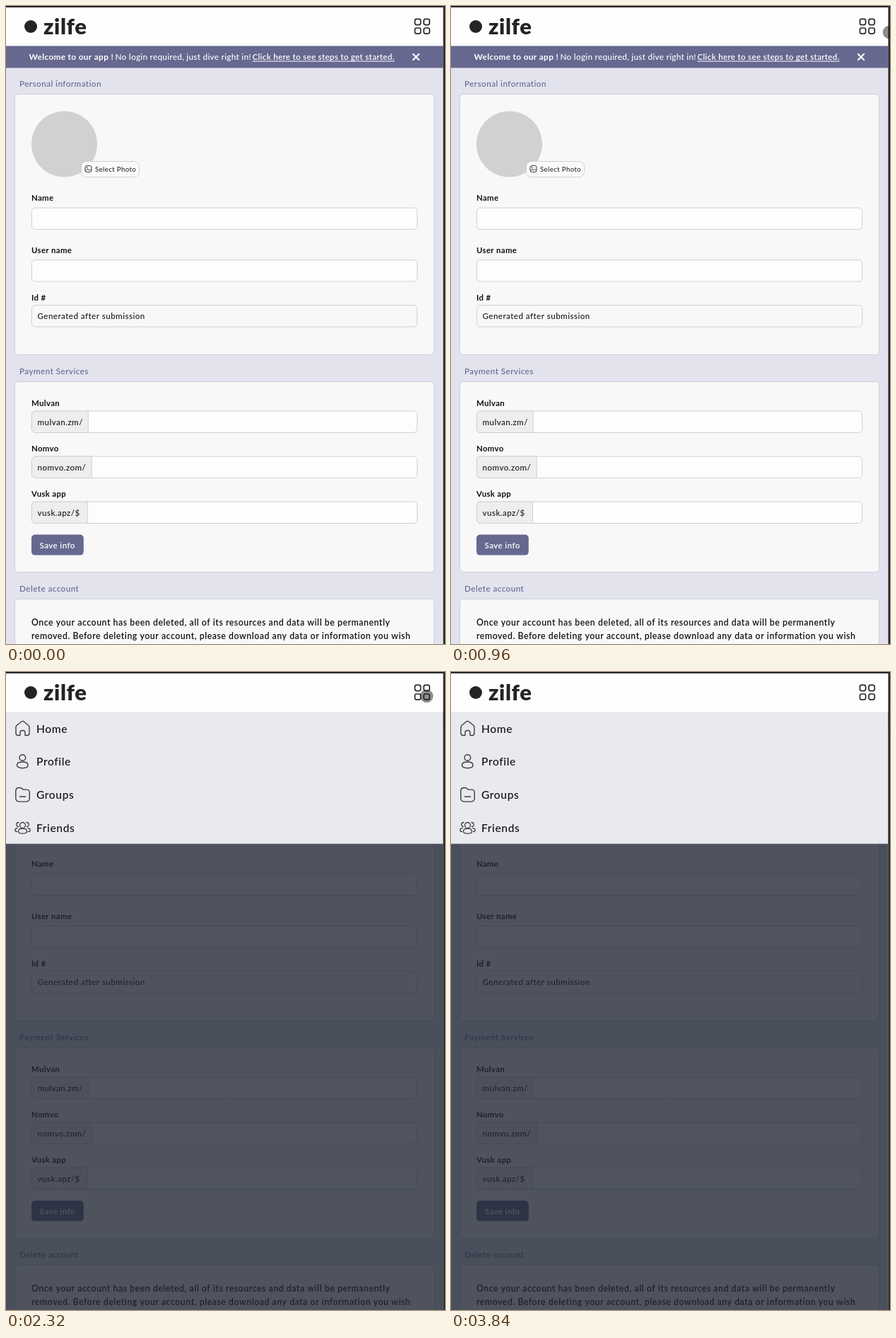
These frames come from a looping animation (621x901 px, 4.56 s). An HTML page with a canvas:

```html
<!DOCTYPE html>
<html lang="en">
<head>
<meta charset="utf-8">
<title>Account settings</title>
<style>
  html, body { margin: 0; width: 100%; height: 100%; overflow: hidden; background: #e2e3ed; }
  canvas { display: block; }
</style>
</head>
<body>
<canvas id="stage" width="621" height="901"></canvas>
<script>
const W = 621, H = 901, LOOP = 4560, STEP = 80;
const PAGE_W = 618.5, HEAD_H = 56.4, MENU_END = 242.6;
const MENU_AT = 1760;
const ACCENT = '#66688f', BORDER = '#cfd0d6', INK = '#17181c';
const ctx = document.getElementById('stage').getContext('2d');

// Pointer dot: time, x, y, opacity
const DOT_PATH = [
  [320, 571, 243, 0.6], [400, 575, 225, 1], [560, 596, 130, 1],
  [720, 613, 52, 1], [799, 618, 38, 1]
];
const DOT_RETURN = [
  [960, 620, 37, 1], [1120, 608, 33, 1], [1280, 596, 30, 1],
  [1360, 594, 29, 1], [2240, 594, 29, 1], [2320, 595, 34, 1],
  [2400, 595, 38, 1], [2640, 595, 38, 1], [2720, 593, 31, 1],
  [2960, 593, 29, 0]
];

function text(str, x, y, size = 11.6, weight = 500, color = INK, gap = 0.45) {
  ctx.font = `${weight} ${size}px Lato, "Open Sans", sans-serif`;
  ctx.letterSpacing = gap + 'px';
  ctx.fillStyle = color;
  ctx.fillText(str, x, y);
}

function box(x, y, w, h, r, fill, stroke, line = 1) {
  ctx.beginPath();
  ctx.roundRect(x, y, w, h, r);
  if (fill) { ctx.fillStyle = fill; ctx.fill(); }
  if (stroke) { ctx.strokeStyle = stroke; ctx.lineWidth = line; ctx.stroke(); }
}

function disc(x, y, r, fill) {
  ctx.beginPath();
  ctx.arc(x, y, r, 0, Math.PI * 2);
  ctx.fillStyle = fill;
  ctx.fill();
}

function line(d, color, width) {
  ctx.strokeStyle = color;
  ctx.lineWidth = width;
  ctx.stroke(new Path2D(d));
}

const label = (str, y) => text(str, 36, y, 11.4, 700, '#111', 0.35);
const heading = (str, y) => text(str, 19, y, 11.7, 500, ACCENT);
const card = (y, h) => box(12.5, y + 0.5, 593, h, 5, '#f8f8f8', '#cdcfe2');
const field = (y, fill = '#fdfdfd') => box(36.4, y + 0.1, 545.3, 30.4, 5, fill, BORDER);

function service(name, prefix, y, split) {
  label(name, y - 7);
  field(y);
  box(36.4, y + 0.1, split - 36.4, 30.4, [5, 0, 0, 5], '#eeeeee', BORDER);
  text(prefix, 44.5, y + 19.5);
}

function drawHeader() {
  ctx.fillStyle = '#fefefe';
  ctx.fillRect(0, 2, PAGE_W, HEAD_H - 2);
  disc(35, 29, 9, '#242427');
  text('zilfe', 53, 40, 31, 900, '#242427', 0.6);
  for (const x of [578.4, 591])
    for (const y of [18.4, 31]) box(x, y, 8.2, 8.2, 2.6, null, '#2b2b2e', 1.7);
}

function drawBanner() {
  ctx.fillStyle = ACCENT;
  ctx.fillRect(0, 56, PAGE_W, 31.4);
  text('Welcome to our app !', 32.5, 76, 11.8, 700, '#fff', 0.35);
  text('No login required, just dive right in!', 154.5, 76, 11.8, 500, '#fff', 0.27);
  const link = 'Click here to see steps to get started.';
  text(link, 348.5, 76, 11.6, 600, '#fff', 0.3);
  ctx.fillRect(348.5, 77.5, ctx.measureText(link).width, 1);
  line('M576 68l8 8M584 68l-8 8', '#fff', 2.3);
}

function drawPersonal() {
  heading('Personal information', 114);
  card(124, 368);
  disc(82.5, 195, 46.5, '#d1d1d1');
  box(106.5, 219.5, 82, 22, 7, '#fafafa', BORDER);
  box(112, 225.5, 9, 9, 2.5, null, '#333', 1);
  line('M112.5 233l2.5-2.5 2 1.5 1.5-1.5 2 2', '#333', 1);
  disc(114.8, 228.3, 0.9, '#333');
  text('Select Photo', 126, 233.5, 9.6, 400, INK, 0.4);
  label('Name', 275);
  field(285);
  label('User name', 349);
  field(358.5);
  label('Id #', 416);
  field(422.5, '#f8f8f8');
  text('Generated after submission', 44.5, 442);
}

function drawPayments() {
  heading('Payment Services', 520);
  card(530, 269);
  service('Mulvan', 'mulvan.zm/', 572, 116.2);
  service('Nomvo', 'nomvo.zom/', 636, 121.2);
  service('Vusk app', 'vusk.apz/$', 700, 115.4);
  box(36, 746.6, 73.8, 29, 5, ACCENT);
  text('Save info', 47.5, 765.5, 11.6, 600, '#fff', 0.4);
}

function drawDelete() {
  heading('Delete account', 827);
  card(837, 90);
  text('Once your account has been deleted, all of its resources and data will be permanently', 36, 875, 12.3, 600, '#111', 0.54);
  text('removed. Before deleting your account, please download any data or information you wish', 36, 894, 12.3, 600, '#111', 0.54);
}

function drawMenu() {
  ctx.fillStyle = 'rgba(31,38,50,.78)';
  ctx.fillRect(0, 56, PAGE_W, H - 56);
  ctx.fillStyle = '#e9eaef';
  ctx.fillRect(0, 56, PAGE_W, MENU_END - 56);
  ['Home', 'Profile', 'Groups', 'Friends'].forEach((name, i) =>
    text(name, 43, 85.7 + i * 46.6, 15.6, 500, '#111', 0.6));
  const ink = '#3c3d42', pen = 1.4;
  // house
  line('M20 89.5H17q-3 0-3-3V78q0-1.6 1.3-2.7l6.5-5.3q1.7-1.3 3.4 0l6.5 5.3q1.3 1.1 1.3 2.7v8.5q0 3-3 3h-3v-4q0-3-3.5-3t-3.500 3z', ink, pen);
  // person
  line('M27.7 121a4.3 4.3 0 1 1-8.6 0a4.3 4.3 0 1 1 8.6 0M15.5 131.5c0-3 3.5-4.500 7.8-4.500s7.8 1.5 7.8 4.5s-3.5 4.2-7.8 4.2s-7.8-1.2-7.8-4.2z', ink, pen);
  // folder
  line('M13.8 168q0-4.500 4.500-4.500h2q1.500 0 2.500 1.300t2.500 1.300h4q4 0 4 4v8q0 5-5 5h-9.500q-5 0-5-5zM19.500 176h8', ink, pen);
  // group
  line('M27.5 216.5a4 4 0 1 1-8 0a4 4 0 1 1 8 0M17.5 225c0-2.6 2.5-3.8 6-3.8s6 1.2 6 3.8s-2.5 3.2-6 3.2s-6-.6-6-3.2zM18 212.5a3 3 0 1 0-.5 6M29 212.5a3 3 0 1 1 .5 6M16 220.5c-5 .5-3.3 5-.5 5M31 220.5c5 .5 3.3 5 .5 5', ink, 1.3);
}

function along(path, t) {
  for (let i = 1; i < path.length; i++) {
    const a = path[i - 1], b = path[i];
    if (t >= a[0] && t <= b[0]) {
      const k = (t - a[0]) / (b[0] - a[0]);
      return a.map((v, j) => v + (b[j] - v) * k);
    }
  }
  return null;
}

function drawPointer(t) {
  const dot = along(DOT_PATH, t) || along(DOT_RETURN, t);
  if (dot) disc(dot[1], dot[2], 9.3, `rgba(20,20,20,${0.48 * dot[3]})`);
  if (t >= 800 && t < 960) {
    const tip = 'M617.5 31l4.5 6-4.5 6z';
    ctx.fillStyle = '#000';
    ctx.fill(new Path2D(tip));
    line(tip, '#fff', 0.8);
  }
}

function render(t) {
  ctx.fillStyle = '#e2e3ed';
  ctx.fillRect(0, 0, W, H);
  ctx.lineCap = ctx.lineJoin = 'round';
  drawBanner();
  drawPersonal();
  drawPayments();
  drawDelete();
  if (t >= MENU_AT) drawMenu();
  drawHeader();
  ctx.fillStyle = '#27282c';
  ctx.fillRect(0, 0, W, 2);
  ctx.fillRect(PAGE_W, 0, W - PAGE_W, H);
  drawPointer(t);
}

const start = performance.now();
function tick() {
  const t = (performance.now() - start) % LOOP;
  render(Math.floor(t / STEP) * STEP);
  requestAnimationFrame(tick);
}
tick();
</script>
</body>
</html>
```
